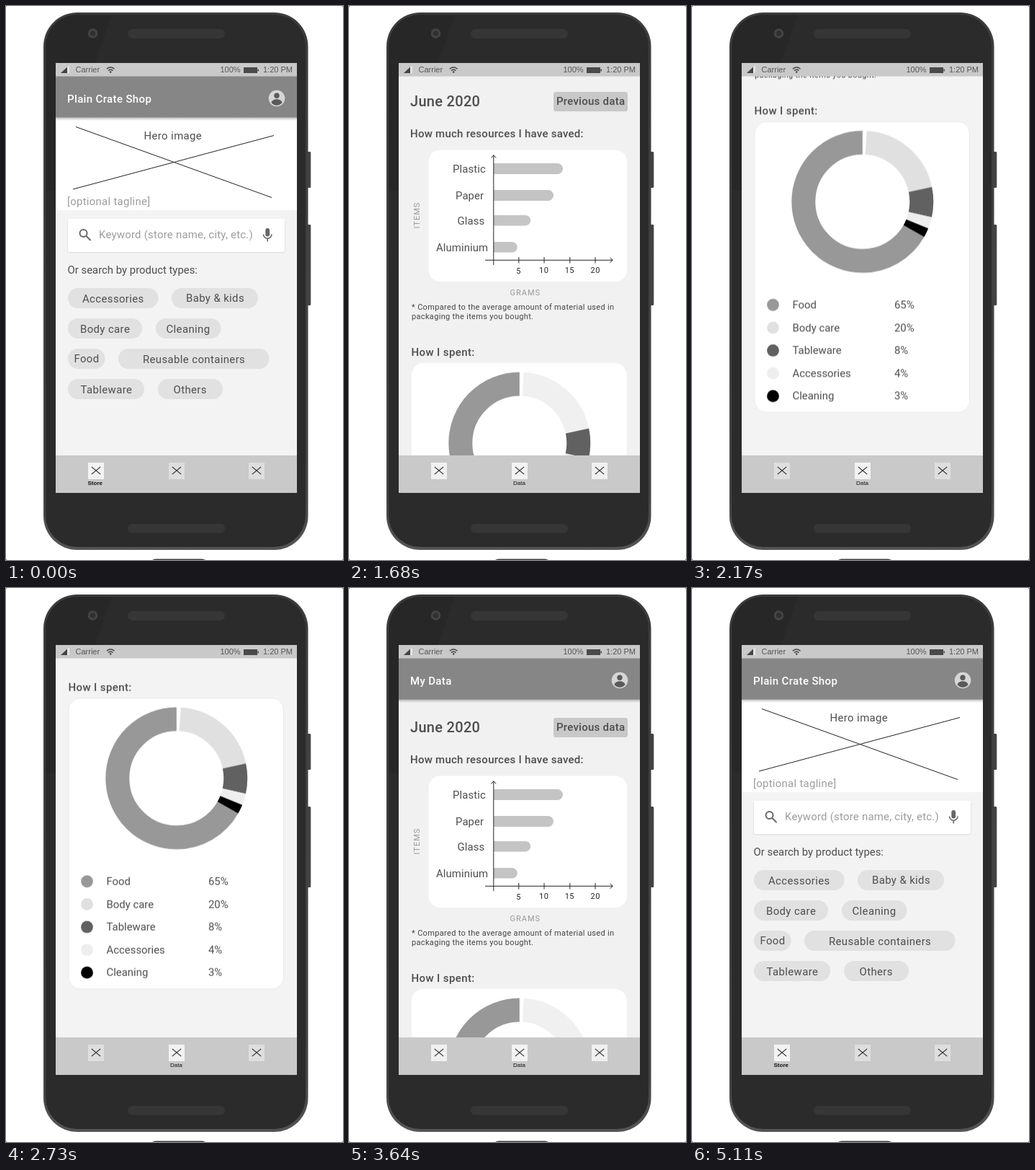
Recreate the animation shown at these times as an HTML page. Size 468 by 768 pixels, loop 5.18 s.

```html
<!DOCTYPE html>
<html lang="en">
<head>
<meta charset="utf-8">
<title>Phone prototype</title>
<style>
  html, body { margin: 0; width: 100%; height: 100%; overflow: hidden; background: #fff; }
  svg { display: block; }
  text { font: 14.9px Roboto, sans-serif; fill: #4d4d4d; }
  .sys text { font: 11px "Liberation Sans", Arial, sans-serif; fill: #555; }
  .wide text, text.wide { letter-spacing: .4px; }
  .med, .title { font-weight: 500; font-size: 15px; letter-spacing: .25px; }
  .title { fill: #fff; letter-spacing: .35px; }
  .month { font-weight: 500; font-size: 20px; letter-spacing: .3px; }
  .axis text { font-size: 11px; letter-spacing: .5px; fill: #222; }
  .unit { font-size: 11px; letter-spacing: 1px; fill: #999; }
  .note { font-size: 11px; letter-spacing: .33px; fill: #444; }
  .hint { fill: #9c9c9c; letter-spacing: .3px; }
  .tab { font: 8px "Liberation Sans", Arial, sans-serif; fill: #111; }
  .line { fill: none; stroke: #222; }
  .ring circle { fill: none; stroke-width: 33; }

  .data, .scroll, .pale, .paleArc, .page, .card {
    animation-duration: 5180ms;
    animation-iteration-count: infinite;
  }
  .data { animation-name: dissolve; animation-timing-function: ease-out; }
  .scroll { animation-name: scroll; animation-timing-function: cubic-bezier(.37, 0, .63, 1); }
  .pale, .paleArc, .page, .card { animation-timing-function: step-end; }
  .pale { animation-name: pale; }
  .paleArc { animation-name: paleArc; }
  .page { animation-name: page; }
  .card { fill: #fff; animation-name: edge; }

  @keyframes dissolve {
    0%, 13.51% { opacity: 0; }
    18.34%, 86.29% { opacity: 1; }
    92.08%, 100% { opacity: 0; }
  }
  @keyframes scroll {
    0%, 28.76% { transform: translateY(0); }
    43.19%, 52.7% { transform: translateY(-403.3px); }
    65.21%, 100% { transform: translateY(0); }
  }
  @keyframes pale { 0%, 63.5%, 100% { fill: #f0f0f0; } 33.78% { fill: #dedede; } }
  @keyframes paleArc { 0%, 63.5%, 100% { stroke: #f0f0f0; } 33.78% { stroke: #e0e0e0; } }
  @keyframes page { 0%, 63.5%, 100% { fill: #f1f1f1; } 33.78% { fill: #f3f3f3; } }
  @keyframes edge { 0%, 63.5%, 100% { stroke: transparent; } 33.78% { stroke: #e9e9e9; } }
</style>
</head>
<body>
<svg width="468" height="768" viewBox="0 0 468 768">
  <defs>
    <linearGradient id="shade" x2="0" y2="1">
      <stop offset="0" stop-color="#000" stop-opacity=".28"/>
      <stop offset="1" stop-color="#000" stop-opacity="0"/>
    </linearGradient>
    <linearGradient id="rim" x2="0" y2="1">
      <stop offset="0" stop-color="#3c3c3c"/>
      <stop offset=".9" stop-color="#434343"/>
      <stop offset="1" stop-color="#555"/>
    </linearGradient>
    <clipPath id="front"><rect x="55" y="12" width="361" height="738" rx="44"/></clipPath>
    <path id="cross" class="line" stroke-width="1.1" d="M-6.2-5.2 6.2 5.2M-6.2 5.2 6.2-5.2"/>
    <rect id="tile" x="-11" y="-11.5" width="22" height="23"/>
    <g id="crosses">
      <use href="#cross" x="125" y="644"/>
      <use href="#cross" x="237" y="644"/>
      <use href="#cross" x="348" y="644"/>
    </g>
    <g id="appBar">
      <rect x="69" y="154" width="335" height="5" fill="url(#shade)"/>
      <rect x="69" y="97" width="335" height="57.5" fill="#868686"/>
      <circle cx="376" cy="128" r="11.3" fill="#d6d6d6"/>
      <circle cx="376" cy="124.2" r="3.7" fill="#5a5a5a"/>
      <path d="M368.5 134c1-6.500 14-6.500 15 0a9.500 9.500 0 0 1-15 0z" fill="#5a5a5a"/>
    </g>
  </defs>

  <!-- phone body -->
  <path d="M0 0h1.500L0 1.500zM468 0v1.500L466.500 0zM0 768v-1.500L1.500 768zM468 768h-1.500l1.500-1.500z" fill="#777"/>
  <path d="M203 768q2-1.500 5-1.500h64q3 0 5 1.500z" fill="#444"/>
  <g fill="#444">
    <rect x="414" y="202" width="9.300" height="50" rx="1.500"/>
    <rect x="414" y="303" width="9.300" height="112" rx="1.500"/>
  </g>
  <rect x="52" y="9" width="367.500" height="745" rx="47" fill="url(#rim)"/>
  <g clip-path="url(#front)">
    <rect x="55" y="12" width="361" height="738" fill="#2b2b2b"/>
    <path d="M55 12h92L69 236v20H55z" fill="#272727"/>
  </g>
  <g fill="#363636">
    <rect x="169" y="32" width="135" height="13" rx="6.500"/>
    <rect x="169" y="718" width="135" height="12.500" rx="6"/>
  </g>
  <circle cx="120.500" cy="38" r="6.800" fill="#444"/>
  <circle cx="120.500" cy="38" r="3.800" fill="#303030"/>

  <rect x="69" y="79" width="335" height="596" fill="#f3f3f3"/>

  <svg x="69" y="97" width="335" height="526" viewBox="69 97 335 526">
    <!-- store -->
    <rect x="69" y="97" width="335" height="186" fill="#fff"/>
    <use href="#appBar"/>
    <text class="title" x="85" y="134">Plain Crate Shop</text>
    <path class="line" d="M97 167.500 369 265.500M93 254 372 179.500"/>
    <text class="wide" x="191.500" y="185">Hero image</text>
    <text class="hint" x="85" y="276">[optional tagline]</text>

    <rect x="85" y="296" width="303" height="46.500" rx="3" fill="#e3e3e3"/>
    <rect x="86" y="295" width="301" height="46" rx="2" fill="#fff"/>
    <g fill="none" stroke="#666" stroke-width="2">
      <circle cx="107.500" cy="315" r="5"/>
      <path d="m111.500 319 6 6"/>
      <path d="M357.500 316.500a5.700 5.700 0 0 0 11.400 0M363.200 322v4.500" stroke-width="1.600"/>
    </g>
    <rect x="360.300" y="308" width="5.800" height="11.500" rx="2.900" fill="#666"/>
    <text class="hint" x="129" y="322" style="letter-spacing:.25px">Keyword (store name, city, etc.)</text>
    <text x="85.500" y="370.500">Or search by product types:</text>

    <g fill="#e1e1e1">
      <rect x="86" y="391" width="125.500" height="28" rx="14"/>
      <rect x="230" y="391" width="120" height="28" rx="14"/>
      <rect x="86" y="433" width="103" height="28" rx="14"/>
      <rect x="208" y="433" width="90.500" height="28" rx="14"/>
      <rect x="86" y="475" width="51.500" height="28" rx="14"/>
      <rect x="156" y="475" width="209.500" height="28" rx="14"/>
      <rect x="86" y="517" width="106" height="28" rx="14"/>
      <rect x="211" y="517" width="90" height="28" rx="14"/>
    </g>
    <g class="wide">
      <text x="106" y="411">Accessories</text>
      <text x="250" y="410">Baby &amp; kids</text>
      <text x="103" y="453">Body care</text>
      <text x="222.500" y="453">Cleaning</text>
      <text x="94.500" y="494">Food</text>
      <text x="190" y="495">Reusable containers</text>
      <text x="103.500" y="537">Tableware</text>
      <text x="232.500" y="537">Others</text>
    </g>

    <!-- my data -->
    <g class="data">
      <rect class="page" x="69" y="97" width="335" height="526"/>
      <g class="scroll">
        <use href="#appBar"/>
        <text class="title" x="85" y="134">My Data</text>
        <text class="month" x="85" y="200">June 2020</text>
        <rect x="284" y="180" width="103" height="27" rx="3" fill="#c8c8c8"/>
        <text class="med" x="288" y="198">Previous data</text>
        <text class="med" x="85" y="243">How much resources I have saved:</text>

        <rect class="card" x="110.500" y="260.500" width="275.500" height="182.500" rx="16"/>
        <path fill="#c4c4c4" d="M201 279h88.500a7.500 7.500 0 0 1 0 15H201zM201 316h75.500a7.500 7.500 0 0 1 0 15H201zM201 351h44a7.200 7.200 0 0 1 0 14.400H201zM201 388h25.500a7.300 7.300 0 0 1 0 14.600H201z"/>
        <text x="144" y="292" letter-spacing=".1">Plastic</text>
        <text x="148" y="329" letter-spacing=".1">Paper</text>
        <text x="150.500" y="364" letter-spacing=".1">Glass</text>
        <text x="121" y="401" letter-spacing=".1">Aluminium</text>
        <g class="axis">
          <path class="line" d="M200.800 268v152M197.500 271.500l3.300-3.800 3.300 3.800M189 413.300h177M362.500 410l3.800 3.300-3.800 3.300M235.800 409v8.500M271 409v8.500M306.800 409v8.500M342 409v8.500"/>
          <text x="232.300" y="431.500">5</text>
          <text x="264" y="431">10</text>
          <text x="299.700" y="431">15</text>
          <text x="335.500" y="431">20</text>
        </g>
        <text class="unit" transform="translate(98 369.500) rotate(-90)">ITEMS</text>
        <text class="unit" x="223.500" y="461.500">GRAMS</text>
        <text class="note" x="87" y="482">* Compared to the average amount of material used in</text>
        <text class="note" x="87" y="495">packaging the items you bought.</text>

        <text class="med" x="86.500" y="545.500" style="letter-spacing:.38px">How I spent:</text>
        <rect class="card" x="87" y="556" width="298.500" height="403" rx="16"/>
        <g class="ring" transform="translate(236.800 667) rotate(-90)">
          <circle r="82" stroke="#989898" pathLength="360" stroke-dasharray="243.800 360" stroke-dashoffset="-119.700"/>
          <circle r="82" class="paleArc" pathLength="360" stroke-dasharray="74.500 360" stroke-dashoffset="-3.500"/>
          <circle r="82" stroke="#616161" pathLength="360" stroke-dasharray="24.600 360" stroke-dashoffset="-78"/>
          <circle r="82" stroke="#eee" pathLength="360" stroke-dasharray="9.400 360" stroke-dashoffset="-102.600"/>
          <circle r="82" stroke="#000" pathLength="360" stroke-dasharray="7.700 360" stroke-dashoffset="-112"/>
        </g>
        <g id="legend"></g>
      </g>
    </g>
  </svg>

  <!-- status bar -->
  <g class="sys">
    <rect x="69" y="79" width="335" height="18.500" fill="#c9c9c9"/>
    <path d="M76 93l9-8.500V93z" fill="#444"/>
    <path d="M85 93v-8.500l3-2V93z" fill="#e4e4e4"/>
    <text x="96.500" y="92">Carrier</text>
    <g fill="none" stroke="#444" stroke-width="1.400">
      <path d="M139.800 87.200q5.400-4.600 10.800 0M142 89.600q3.200-2.600 6.400 0"/>
    </g>
    <circle cx="145.200" cy="91.500" r="1.300" fill="#444"/>
    <text x="297.500" y="91.500">100%</text>
    <path d="M330 85h19v8h-19zM349.500 87.500h1.500v3h-1.500z" fill="#4a4a4a"/>
    <text x="357" y="92">1:20 PM</text>
  </g>

  <!-- tab bar -->
  <rect x="69" y="623" width="335" height="52" fill="#c9c9c9"/>
  <g fill="#dedede">
    <use href="#tile" x="125" y="644.500" fill="#f3f3f3"/>
    <use href="#tile" x="237" y="644.500"/>
    <use href="#tile" x="348" y="644.500"/>
  </g>
  <use href="#crosses"/>
  <text class="tab" x="113.500" y="664" style="font-weight:700">Store</text>
  <g class="data">
    <rect x="69" y="623" width="335" height="52" fill="#c9c9c9"/>
    <g class="pale">
      <use href="#tile" x="125" y="644.500"/>
      <use href="#tile" x="348" y="644.500"/>
    </g>
    <use href="#tile" x="237" y="644.500" fill="#f2f2f2"/>
    <use href="#crosses"/>
    <text class="tab" x="228" y="664">Data</text>
  </g>
</svg>
<script>
  const shares = [
    ["Food", 65, "#989898"],
    ["Body care", 20, "#e0e0e0"],
    ["Tableware", 8, "#616161"],
    ["Accessories", 4, "#eee"],
    ["Cleaning", 3, "#000"]
  ];
  document.getElementById("legend").innerHTML = shares.map(([name, part, color], i) => {
    const y = 810 + i * 31.6;
    return `<circle cx="112.500" cy="${y}" r="8.400" fill="${color}"/>
      <text x="139.500" y="${y + 5}">${name}</text>
      <text x="281" y="${y + 5}">${part}%</text>`;
  }).join("");
</script>
</body>
</html>
```
